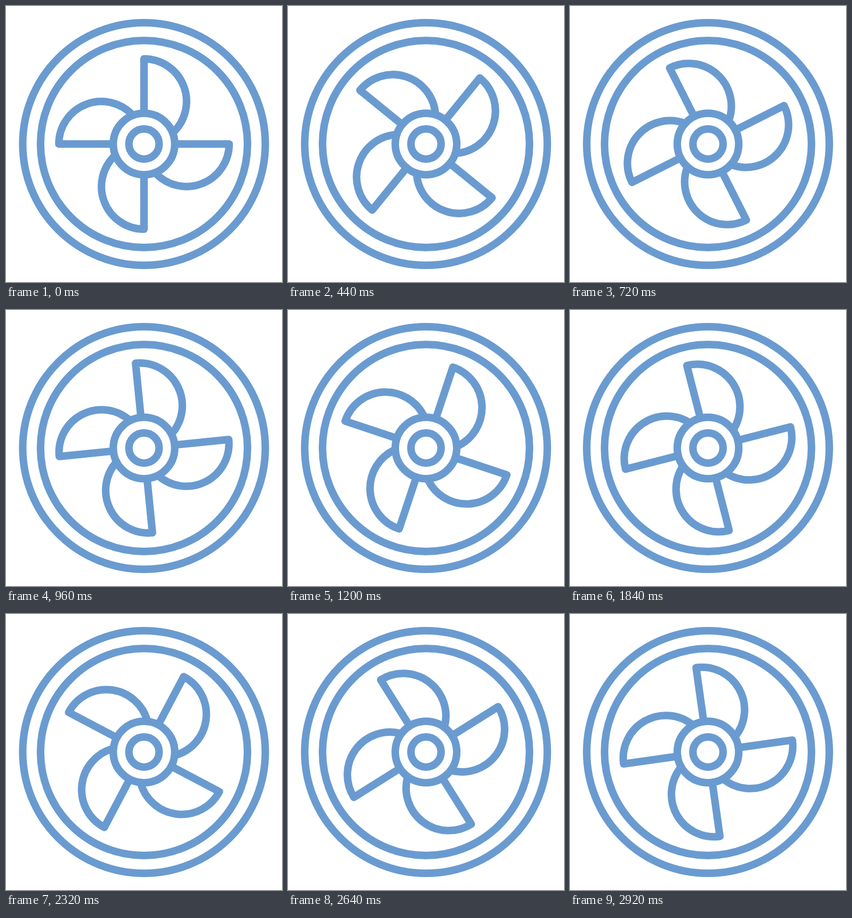
An HTML page that plays this animation: 512x512 px, repeating every 2.96 s.

```html
<!DOCTYPE html>
<html lang="en">
<head>
<meta charset="utf-8">
<title>Fan</title>
<style>
  html, body { margin: 0; width: 100%; height: 100%; overflow: hidden; background: #fff; }
  svg { display: block; width: 100vw; height: 100vh; }
</style>
</head>
<body>
<svg viewBox="-256 -256 512 512" fill="none" stroke="#6a9bd0" stroke-width="14" stroke-linecap="round" stroke-linejoin="round">
  <defs><path id="blade" d="M0-57V-158A79 79 0 0 1 53.1-20.6"/></defs>
  <circle r="225"/>
  <circle r="192"/>
  <g id="fan">
    <use href="#blade"/>
    <use href="#blade" transform="rotate(90)"/>
    <use href="#blade" transform="rotate(180)"/>
    <use href="#blade" transform="rotate(270)"/>
  </g>
  <circle r="57"/>
  <circle r="28"/>
</svg>
<script>
  const LOOP = 2960, STEP = 40, DEGREES = 3.011;
  const fan = document.getElementById('fan');
  const start = performance.now();

  // The fan turns at 30 ticks a second, shown in steps of 40 ms.
  function draw() {
    const step = Math.floor((performance.now() - start) % LOOP / STEP);
    const tick = Math.floor(step * 6 / 5);
    fan.setAttribute('transform', `rotate(${tick * DEGREES})`);
    requestAnimationFrame(draw);
  }
  draw();
</script>
</body>
</html>
```
